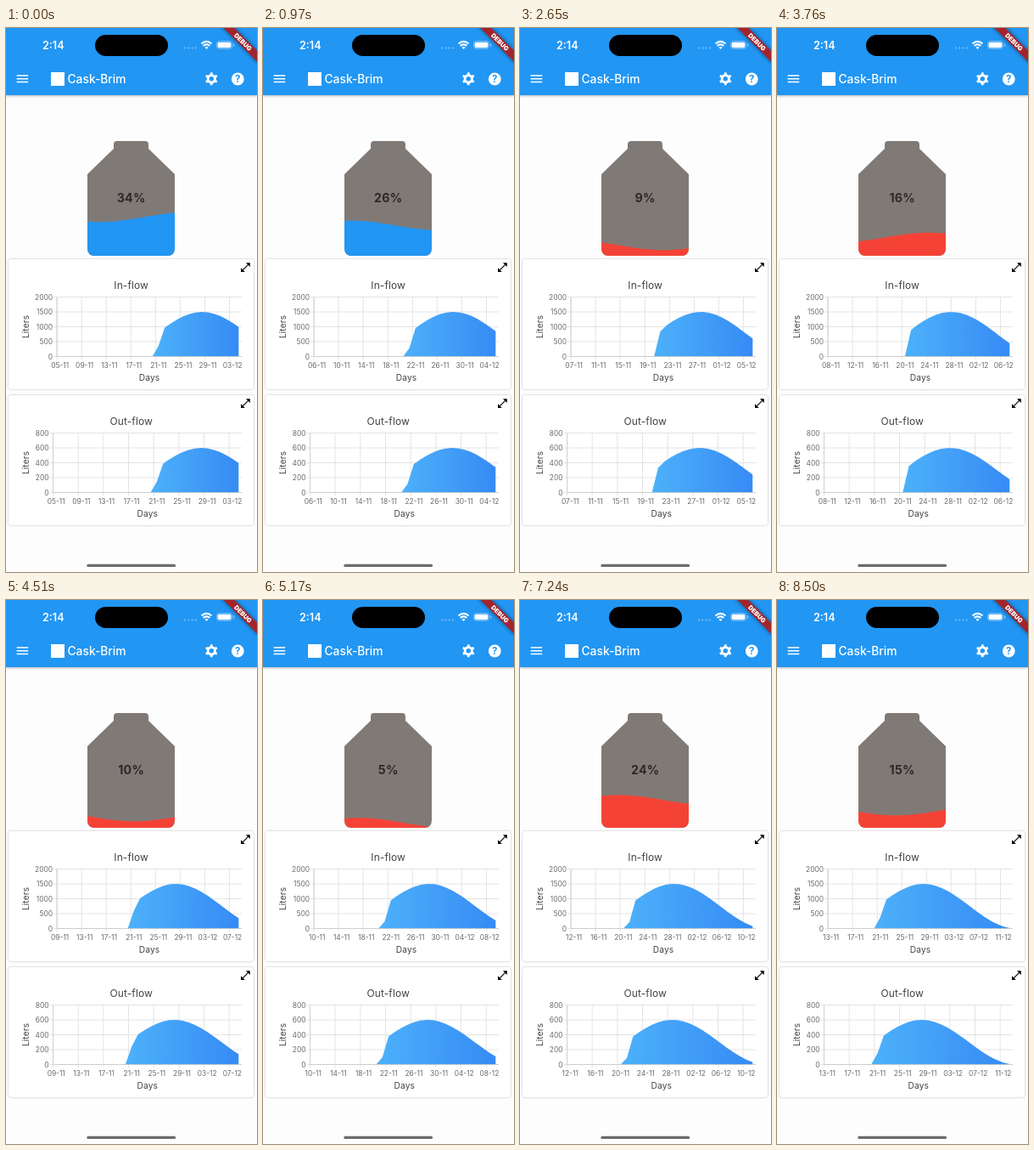
An HTML page for the animation above (8.59 s loop, 296 by 640 pixels).

```html
<!DOCTYPE html>
<html lang="en">
<head>
<meta charset="utf-8">
<title>Water tank</title>
<style>
  html, body { margin: 0; width: 100%; height: 100%; overflow: hidden; background: #fdfdfd; }
  svg { display: block; width: 296px; height: 640px; font-family: Inter, Roboto, sans-serif; }
  .card { fill: #fff; filter: drop-shadow(0 .8px 1px rgba(0,0,0,.28)); }
  .heading { font-size: 12px; fill: #424242; letter-spacing: .1px; }
  .axis { font-size: 10.2px; fill: #424242; letter-spacing: .1px; }
  .tick { font-size: 8.4px; fill: #6a6a6a; }
  .grid { stroke: #dedede; stroke-width: .8; }
  .mid { text-anchor: middle; }
  .end { text-anchor: end; }
</style>
</head>
<body>
<svg id="stage" viewBox="0 0 296 640">
  <defs>
    <linearGradient id="flow">
      <stop offset="0" stop-color="#4db1fa"/>
      <stop offset="1" stop-color="#368bf4"/>
    </linearGradient>
    <clipPath id="tankClip">
      <path id="tankShape" d="M131 133H164Q168 133 168 137V142L199 172V259Q199 268 190 268H105Q96 268 96 259V172L127 142V137Q127 133 131 133Z"/>
    </clipPath>
  </defs>
  <rect width="296" height="640" fill="#fdfdfd"/>

  <rect width="296" height="79" fill="#2196f3" style="filter:drop-shadow(0 1.5px 1.5px rgba(0,0,0,.3))"/>
  <rect x="105" y="8" width="86" height="25" rx="12.5"/>
  <g fill="#fff">
    <text x="43" y="24.5" font-size="12.6" font-weight="600">2:14</text>
    <path d="M210 23.5h15" stroke="#fff" stroke-opacity=".35" stroke-width="2" stroke-dasharray="2 2.3"/>
    <g fill="none" stroke="#fff" stroke-width="2">
      <path d="M230.5 18.4Q236.5 13.4 242.5 18.4"/>
      <path d="M232.6 21Q236.5 17.8 240.4 21"/>
    </g>
    <path d="M234.4 22.8Q236.5 21.2 238.6 22.8L236.5 25Z"/>
    <rect x="248.4" y="15.6" width="18.2" height="8.8" rx="2.8" fill="none" stroke="#fff" stroke-opacity=".45" stroke-width=".8"/>
    <rect x="249.6" y="16.8" width="15.8" height="6.4" rx="1.8"/>
    <rect x="268" y="18.3" width="1.2" height="3.4" rx=".6" opacity=".5"/>
    <path d="M12.6 56h13.6M12.6 59.8h13.6M12.6 63.6h13.6" stroke="#fff" stroke-width="1.5"/>
    <rect x="53" y="52" width="16" height="16"/>
    <text x="72.5" y="64.6" font-size="13.8" font-weight="500">Cask-Brim</text>
    <circle cx="273.3" cy="60" r="7.4"/>
    <text class="mid" x="273.3" y="64" font-size="11.5" font-weight="700" style="fill:#2196f3">?</text>
  </g>
  <g fill="none" stroke="#fff" transform="rotate(18 242.3 59.8)">
    <circle cx="242.3" cy="59.8" r="4.2" stroke-width="3"/>
    <circle cx="242.3" cy="59.8" r="6.3" stroke-width="2.4" pathLength="60" stroke-dasharray="4 6"/>
  </g>
  <g transform="translate(296 0) rotate(45)">
    <rect x="-32" y="18.8" width="64" height="9.1" fill="#a3242b" style="filter:drop-shadow(0 0 2.5px rgba(0,0,0,.5))"/>
    <text class="mid" y="26" font-size="7.4" font-weight="900" fill="#fff">DEBUG</text>
  </g>

  <use href="#tankShape" fill="#807a77"/>
  <path id="water" clip-path="url(#tankClip)"/>
  <text id="percent" class="mid" x="147.7" y="204.8" font-size="14.2" font-weight="700" letter-spacing=".3" fill="#2c2928"></text>

  <g id="charts"></g>
  <rect x="95.3" y="630.8" width="104.8" height="3.2" rx="1.6" fill="#6c6c6c"/>
</svg>
<script>
const LOOP = 8590;
const DAY = 1060, FIRST_MIDNIGHT = 590;
const DAYS_SHOWN = 30, LABEL_EVERY = 4;

// Screen refreshes: first time, last time, count
const bursts = [
  [120, 970, 9], [1090, 1870, 8], [1980, 2750, 8], [2870, 3650, 8], [3760, 4510, 8],
  [4620, 5470, 9], [5570, 6330, 8], [6440, 7240, 8], [7360, 8180, 9], [8280, 8500, 3]
];
const refreshes = [0, ...bursts.flatMap(([from, to, count]) =>
  Array.from({ length: count }, (_, i) => from + (to - from) * i / (count - 1)))];

// Time and fill percentage
const levels = [[0, 33.6], [970, 26.45], [2650, 9], [3760, 16], [5170, 4.4], [7240, 24.4], [8500, 15]];

const byId = id => document.getElementById(id);
function add(parent, tag, attrs, text) {
  const node = document.createElementNS(parent.namespaceURI, tag);
  for (const key in attrs) node.setAttribute(key, attrs[key]);
  if (text !== undefined) node.textContent = text;
  return parent.appendChild(node);
}

function makeChart(title, top, left, max, step) {
  const right = 278, base = top + 114.5, height = 70;
  const slot = (right - left) / DAYS_SHOWN;
  const g = add(byId('charts'), 'g');
  add(g, 'rect', { class: 'card', x: 3, y: top, width: 289, height: 153, rx: 3 });
  add(g, 'path', {
    d: 'M21 11V3h-8l3.29 3.29-10 10L3 13v8h8l-3.29-3.29 10-10z',
    transform: `translate(275.2 ${top + 2.4}) scale(.6)`
  });
  add(g, 'text', { class: 'heading mid', x: 147.7, y: top + 35 }, title);
  add(g, 'text', { class: 'axis mid', x: left + (right - left) / 2, y: top + 142.7 }, 'Days');
  add(g, 'text', { class: 'axis mid', transform: `translate(27 ${top + 79.5}) rotate(-90)` }, 'Liters');

  for (let v = 0; v <= max; v += step) {
    const y = base - height * v / max;
    add(g, 'path', { class: 'grid', d: `M${left - 4} ${y}H${right}` });
    add(g, 'text', { class: 'tick end', x: left - 5, y: y + 3 }, v);
  }
  const labels = [];
  for (let i = 0; i < DAYS_SHOWN; i += LABEL_EVERY) {
    const x = left + i * slot;
    add(g, 'path', { class: 'grid', d: `M${x} ${base - height}V${base + 4}` });
    labels.push(add(g, 'text', { class: 'tick mid', x: x + slot / 2, y: base + 13.4 }));
  }
  const area = add(g, 'path', { fill: 'url(#flow)' });
  add(g, 'path', { d: `M${left} ${base - height}V${base}H${right}`, fill: 'none', stroke: '#c9c9c9', 'stroke-width': .8 });

  return (firstDay, hour) => {
    labels.forEach((label, i) => label.textContent = dateText(firstDay + i * LABEL_EVERY));
    const lastDay = firstDay + DAYS_SHOWN - 1;
    const xOf = day => left + (day - firstDay + .5) * slot;
    let d = `M${xOf(20)} ${base}`;
    for (let day = 21; day <= lastDay; day++) {
      d += `L${xOf(day)} ${(base - 52.5 * flowAt(day, hour)).toFixed(2)}`;
    }
    area.setAttribute('d', `${d}V${base}Z`);
  };
}

// Days count on from 1 November
function dateText(day) {
  const [d, month] = day > 30 ? [day - 30, 12] : [day, 11];
  return `${String(d).padStart(2, '0')}-${month}`;
}

// Share of the peak flow; the first day only runs up to the current hour
function flowAt(day, hour) {
  const distance = day - 28.5 + hour;
  const bell = (1 + Math.cos(Math.PI * distance / 15)) / 2;
  return day === 21 ? bell * hour : bell;
}

function levelAt(t) {
  const i = levels.findIndex(([time]) => time > t);
  if (i < 0) return levels[levels.length - 1][1];
  const [t0, a] = levels[i - 1], [t1, b] = levels[i];
  return a + (b - a) * (t - t0) / (t1 - t0);
}

function drawTank(t) {
  const level = levelAt(t);
  const mean = 268 - 1.35 * level;
  const crest = 7 + .1005 * t;
  let d = 'M96 268';
  for (let x = 96; x <= 200; x += 4) {
    d += `L${x} ${(mean - 5.6 * Math.cos(2 * Math.PI * (x - crest) / 206)).toFixed(2)}`;
  }
  byId('water').setAttribute('d', d + 'V268Z');
  byId('water').setAttribute('fill', level > 25 ? '#2196f3' : '#f44336');
  byId('percent').textContent = Math.round(level) + '%';
}

const charts = [
  makeChart('In-flow', 272, 60, 2000, 500),
  makeChart('Out-flow', 432, 55.5, 800, 200)
];

function draw(t) {
  const elapsed = (t - FIRST_MIDNIGHT) / DAY + 1;
  const day = Math.floor(elapsed);
  charts.forEach(update => update(5 + day, elapsed - day));
  drawTank(t);
}

const start = performance.now();
let shown = -1;
function tick() {
  const t = (performance.now() - start) % LOOP;
  const current = refreshes.filter(time => time <= t).length - 1;
  if (current !== shown) draw(refreshes[shown = current]);
  requestAnimationFrame(tick);
}
tick();
</script>
</body>
</html>
```
